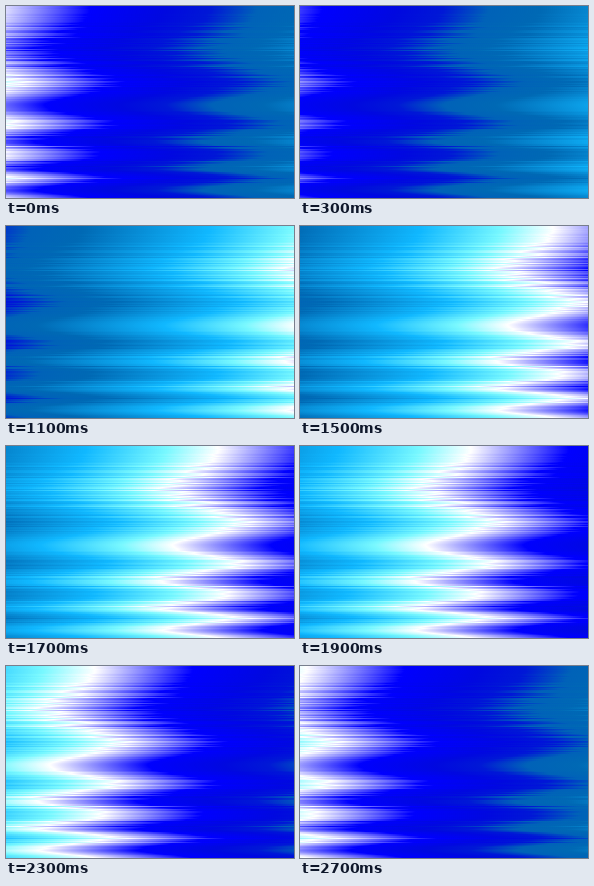
An HTML page with a canvas for the animation above (2.8 s loop, 288 by 192 pixels).

```html
<!DOCTYPE html>
<html lang="en">
<head>
<meta charset="utf-8">
<title>Scrolling colour streaks</title>
<style>
  html, body { margin: 0; width: 100%; height: 100%; overflow: hidden; background: #00e; }
  canvas { display: block; width: 288px; height: 192px; image-rendering: pixelated; }
</style>
</head>
<body>
<canvas id="stage" width="288" height="192"></canvas>
<script>
const W = 288, H = 192, CYCLE = W * 2, STEPS = 28, STEP_MS = 100;
const LEAD = 14;         // how far past white the cycle begins
const CHIRP = 7900;      // period of the wave in squared rows
const CALM = 98;         // rows between two calm zones

// Colours along one cycle.
const palette = [
  [0, '#fff'], [0.17, '#00f'], [0.3, '#0008e0'], [0.38, '#0018d6'],
  [0.46, '#0062b8'], [0.55, '#0069b4'], [0.77, '#10b8ff'],
  [0.91, '#78f8ff'], [1, '#fff']
];

const mod = (a, n) => ((a % n) + n) % n;

function seeded(seed) {
  return () => (seed = (seed * 16807) % 2147483647) / 2147483647;
}

// Two cycles side by side, so any row can be cut in one piece.
function makeStrip() {
  const strip = document.createElement('canvas');
  strip.width = CYCLE * 2;
  strip.height = 1;
  const g = strip.getContext('2d');
  for (const x of [0, CYCLE]) {
    const fill = g.createLinearGradient(x, 0, x + CYCLE, 0);
    for (const [pos, colour] of palette) fill.addColorStop(pos, colour);
    g.fillStyle = fill;
    g.fillRect(x, 0, CYCLE, 1);
  }
  return strip;
}

// Each row is shifted by a tightening wave, a slow drift and random streaks.
const random = seeded(7331);
const shifts = Array.from({ length: H }, (_, y) => {
  const wave = -34 * Math.sin(2 * Math.PI * y * y / CHIRP);
  const streak = 30 * Math.abs(Math.sin(Math.PI * y / CALM));
  return wave - 0.12 * y + streak * (random() + random() - 1);
});

const strip = makeStrip();
const ctx = document.getElementById('stage').getContext('2d');
ctx.imageSmoothingEnabled = false;

function draw(step) {
  const scroll = LEAD + step * CYCLE / STEPS;
  shifts.forEach((shift, y) => {
    const from = mod(Math.round(scroll - shift), CYCLE);
    ctx.drawImage(strip, from, 0, W, 1, 0, y, W, 1);
  });
}

const start = performance.now();
let shown = -1;

function tick() {
  const step = Math.floor((performance.now() - start) / STEP_MS) % STEPS;
  if (step !== shown) draw(shown = step);
  requestAnimationFrame(tick);
}
tick();
</script>
</body>
</html>
```
